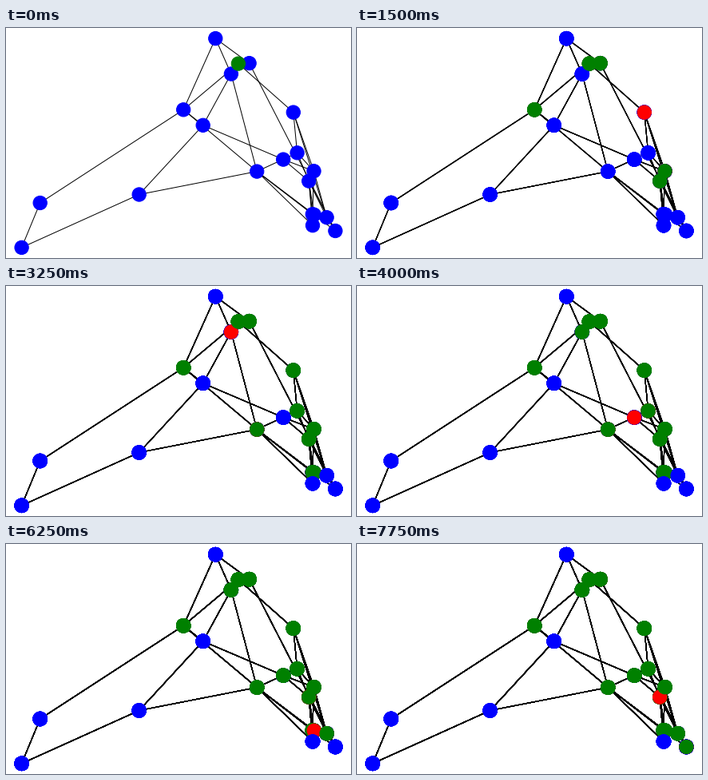
These frames come from a looping animation (432x288 px, 8000 ms). A matplotlib script:

```python
import matplotlib.pyplot as plt
from matplotlib.animation import FuncAnimation
from matplotlib.collections import LineCollection

W, H, DPI = 432, 288, 72
STEP_MS = 250

# Node centres in pixels, listed from back to front.
NODES = {
    "C": (262.3, 13.1), "E": (222.2, 102.3), "F": (246.7, 121.8),
    "R": (166.7, 208.5), "S": (42.7, 219), "T": (19.6, 274.9),
    "G": (314.2, 179.6), "H": (347.2, 164.6), "I": (364.6, 156.3),
    "J": (359.8, 105.6), "M": (383.8, 233.2), "N": (385.8, 233.8),
    "O": (384, 247.2), "P": (401.6, 237.2), "Q": (412.4, 254),
    "L": (379.2, 191.6), "K": (385.5, 179.2), "B": (304.6, 44.1),
    "D": (281.9, 57.5), "A": (290.9, 44.6),
}
EDGES = ("CE CD CB AB AD AE AJ BQ DF DG EF EG ES ST TR RF RG FH GI HK HL "
         "JI JK JP IL IK LK LM LN LO LP LQ KP KM GM GN GO GQ MN NO MP PQ").split()
WALK = "AEABLKJIGNLMGDGIHKPMLKLPLNGEABQL"


def node_colors(step):
    """Blue is unseen, green visited, red the walker's place."""
    seen = set(WALK[:step + 1])
    colors = ["green" if n in seen else "blue" for n in NODES]
    if step:
        colors[list(NODES).index(WALK[step])] = "red"
    return colors


fig = plt.figure(figsize=(W / DPI, H / DPI), dpi=DPI, facecolor="white")
ax = fig.add_axes([0, 0, 1, 1])
ax.set_xlim(0, W)
ax.set_ylim(H, 0)
ax.axis("off")

segments = [(NODES[a], NODES[b]) for a, b in EDGES]
xs, ys = zip(*NODES.values())

# Each step paints the graph again on top, so the soft edges harden.
layers = []
for step in range(len(WALK)):
    lines = LineCollection(segments, colors="black", linewidths=1, zorder=1)
    ax.add_collection(lines, autolim=False)
    dots = ax.scatter(xs, ys, s=300, c=node_colors(step), linewidths=1, zorder=2)
    layers.append((lines, dots))


def draw(step):
    for i, layer in enumerate(layers):
        for artist in layer:
            artist.set_visible(i <= step)
    return [artist for layer in layers for artist in layer]


anim = FuncAnimation(fig, draw, frames=len(WALK), interval=STEP_MS,
                     repeat=True, repeat_delay=0, blit=False)
plt.show()
```
